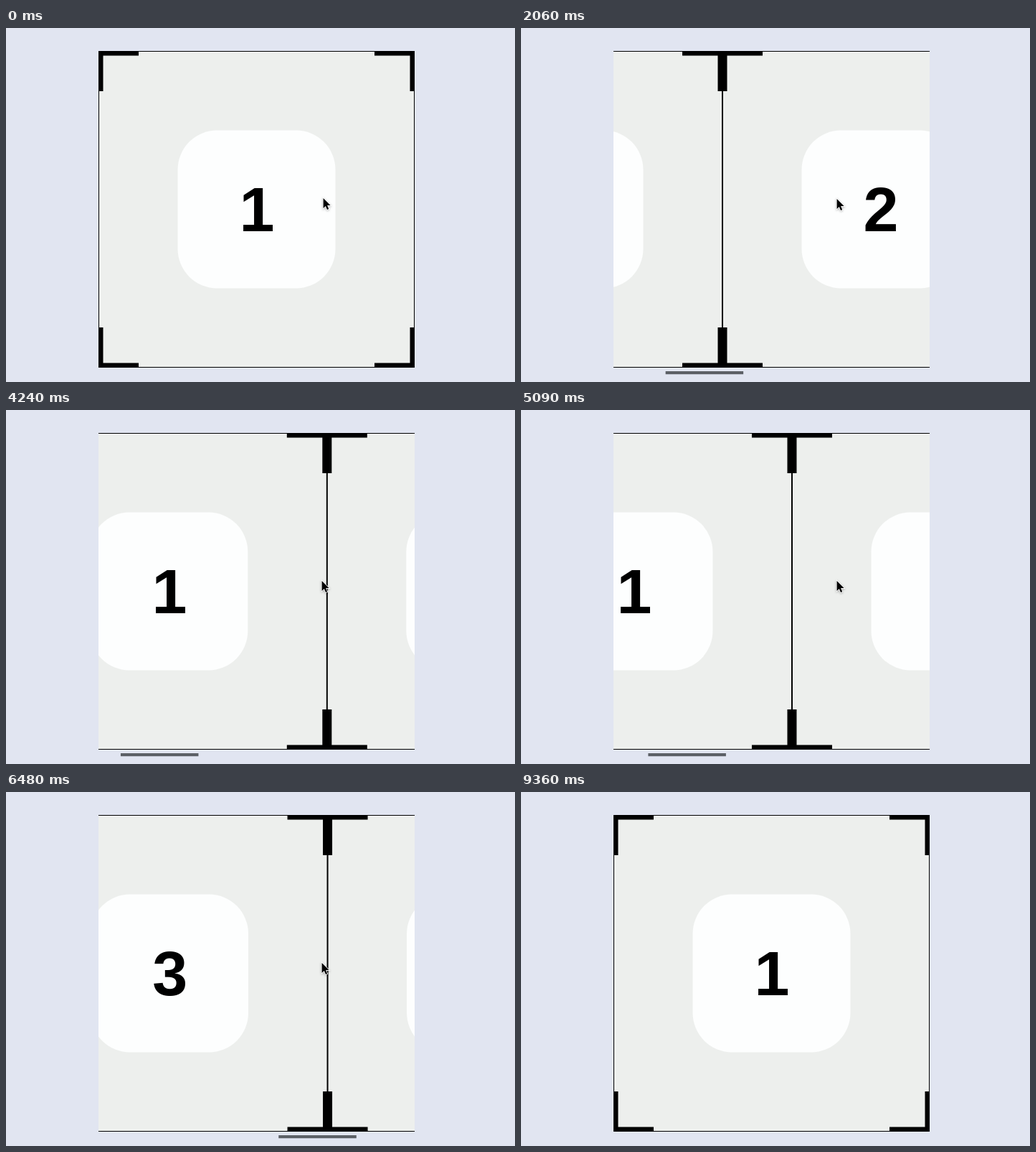
An HTML page for the animation above (10000 ms loop, 710 by 493 pixels).

```html
<!DOCTYPE html>
<html lang="en">
<head>
<meta charset="utf-8">
<title>Scrolling pages</title>
<style>
  html, body { margin: 0; width: 100%; height: 100%; overflow: hidden; background: #e1e5f1; }
  svg { display: block; }
  text { font: bold 88px "Liberation Sans", Arial, sans-serif; text-anchor: middle; }
  #cursor { filter: drop-shadow(0 1.5px 1.5px rgba(0, 0, 0, .3)); }
</style>
</head>
<body>
<svg width="710" height="493" viewBox="0 0 710 493">
  <defs>
    <clipPath id="port"><rect x="129" y="32" width="441" height="441"/></clipPath>
  </defs>
  <g clip-path="url(#port)">
    <rect x="129" y="32" width="441" height="441" fill="#edefed"/>
    <g id="strip"></g>
  </g>
  <rect id="thumb" y="478" width="108.5" height="4.2" fill="#5c6066"/>
  <path id="cursor" d="M0 0V14L3.2 11L5.4 16L7.6 15L5.5 10.1H10Z"
        fill="#000" stroke="#fff" stroke-width="1.6" paint-order="stroke"/>
</svg>
<script>
const LOOP = 10000, LEFT = 129, TOP = 32, SIZE = 441, PAGES = 4;
const END = SIZE * (PAGES - 1), GONE = 9060;
const $ = id => document.getElementById(id);

const smooth = u => u * u * (3 - 2 * u);
const settle = u => 1 - (1 - u) ** 2;
const gather = u => u ** 1.4;
const ramp = (t, from, to) => Math.min(1, Math.max(0, (t - from) / (to - from)));

// Each swipe carries the strip on from where the last one left it.
const swipes = [
  { from: 520, to: 1300, x: 170, ease: smooth },
  { from: 1670, to: 2060, x: 289, ease: smooth },
  { from: 2270, to: 3150, x: 1037.4, ease: smooth },
  { from: 3420, to: 4670, x: 0, ease: settle },
  { from: 4910, to: 5940, x: 599, ease: settle },
  { from: 5940, to: 6760, x: END, ease: gather },
  { from: 7150, to: 7610, x: 1158.5, ease: smooth },
  { from: 7790, to: 8270, x: 0, ease: smooth }
];
const offset = t => swipes.reduce((x, s) => x + (s.x - x) * s.ease(ramp(t, s.from, s.to)), 0);

const rect = (cx, cy, w, h, fill, rx = 0) =>
  `<rect x="${cx - w / 2}" y="${cy - h / 2}" width="${w}" height="${h}" rx="${rx}" fill="${fill}"/>`;

// The border between two pages, with the corner marks of both.
function edge(n) {
  const x = LEFT + n * SIZE;
  let out = rect(x, TOP + SIZE / 2, 2, SIZE, "#000");
  for (const y of [TOP, TOP + SIZE]) {
    out += rect(x, y, 13, 112, "#000") + rect(x, y, 112, 13, "#000");
    out += rect(x + SIZE / 2, y, SIZE, 2, "#000");
  }
  return out;
}

function card(n) {
  const x = LEFT + (n + .5) * SIZE;
  return rect(x, TOP + SIZE / 2, 220, 220, "#fdfefe", 55) + `<text x="${x + .6}" y="283">${n + 1}</text>`;
}

for (let n = 0; n <= PAGES; n++) {
  $("strip").innerHTML += edge(n) + (n < PAGES ? card(n) : "");
}

function draw(t) {
  const s = offset(t);
  $("strip").setAttribute("transform", `translate(${-s} 0)`);
  $("thumb").setAttribute("x", 129.4 + s / PAGES);
  $("thumb").setAttribute("opacity", ramp(t, 520, 550) - ramp(t, 8760, 9000));

  const settleIn = ramp(t, 210, 330), leave = smooth(ramp(t, 8760, GONE));
  const x = 442.6 - 2 * settleIn - 400 * leave, y = 237 + settleIn - 2 * leave;
  $("cursor").setAttribute("transform", `translate(${x} ${y})`);
  $("cursor").setAttribute("visibility", t < GONE ? "visible" : "hidden");
}

const start = performance.now();
function tick() {
  draw((performance.now() - start) % LOOP);
  requestAnimationFrame(tick);
}
tick();
</script>
</body>
</html>
```
